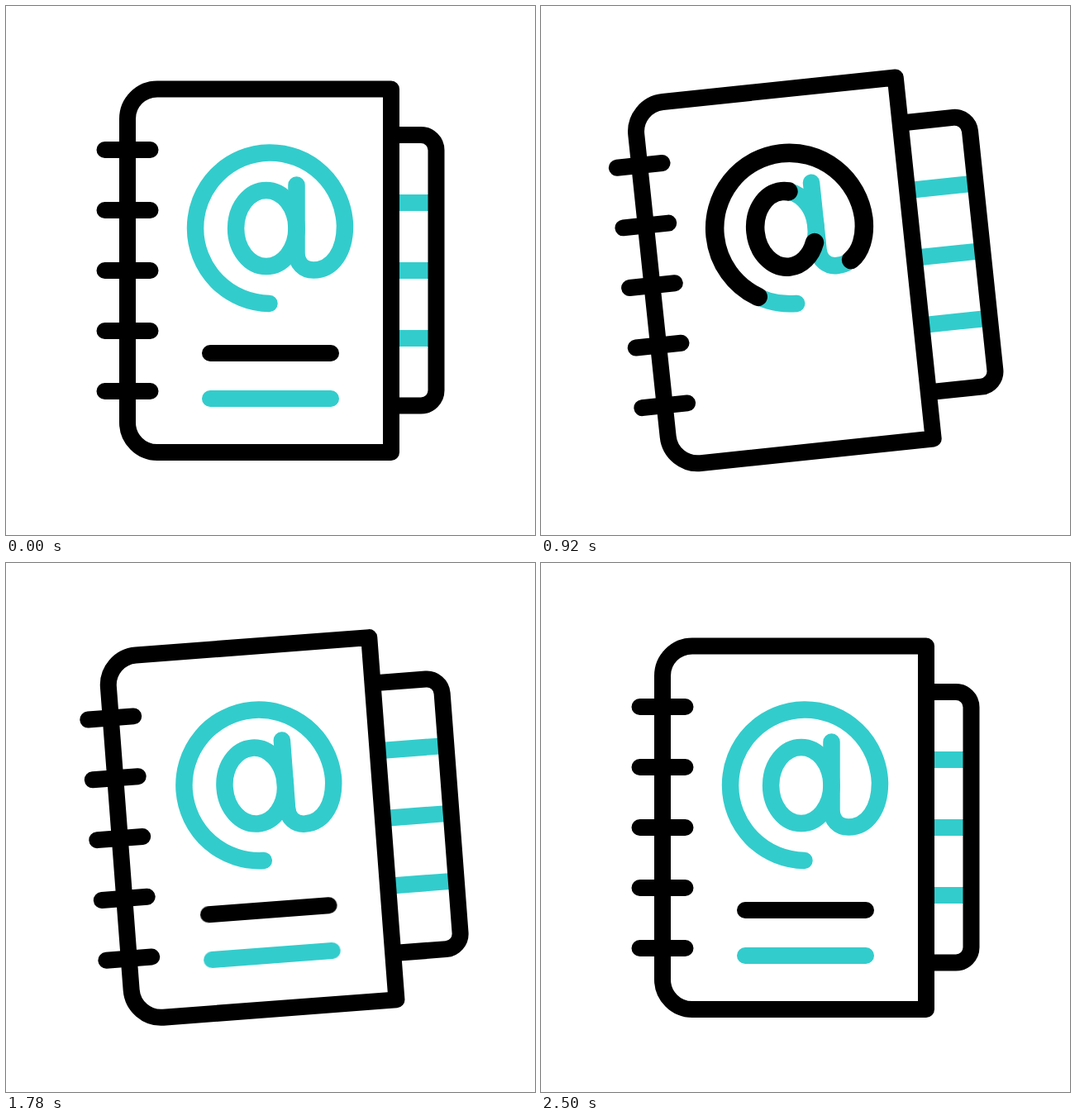
Recreate the animation shown at these times as an HTML page without scripts. Size 640 px wide and 640 px high, loop 2720 ms.

```html
<!DOCTYPE html>
<html lang="en">
<head>
<meta charset="utf-8">
<title>Address book</title>
<style>
  @property --head { syntax: "<length>"; inherits: false; initial-value: 100px; }
  @property --tail { syntax: "<length>"; inherits: false; initial-value: 0px; }

  :root { --loop: 2720ms; --smooth: cubic-bezier(.333, 0, .667, 1); }
  html, body { margin: 0; width: 100%; height: 100%; overflow: hidden; background: #fff; }
  svg {
    display: block; width: 100%; height: 100%;
    fill: none; stroke: #000; stroke-width: 20; stroke-linecap: round; stroke-linejoin: round;
  }

  .teal { stroke: #33cccc; }
  .cover { fill: #fff; }
  .sign { stroke-width: 20.5; }

  .book {
    transform-origin: 320px 320px;
    animation: tilt var(--loop) var(--smooth) infinite, drift var(--loop) var(--smooth) infinite;
  }
  .tabs { animation: slide var(--loop) var(--smooth) infinite; }

  /* Visible part of a path runs from --tail to --head, in percent of its length */
  .trim {
    stroke-dasharray: max(0px, var(--head) - var(--tail)) 200px;
    stroke-dashoffset: calc(-1 * var(--tail));
  }
  .trace {
    stroke-width: 22.5;
    animation: head var(--loop) var(--smooth) infinite,
               tail var(--loop) var(--smooth) infinite,
               show var(--loop) step-end infinite;
  }
  .line {
    animation: erase var(--loop) var(--smooth) infinite both,
               grow var(--loop) var(--smooth) infinite both;
  }
  .line.teal { animation-delay: 60ms, 150ms; }

  @keyframes tilt {
    0% { rotate: 0deg; }
    .74% { rotate: 0deg; animation-timing-function: cubic-bezier(.33, .62, .67, 1); }
    33.8%, 60.3% { rotate: -6deg; }
    75.2%, 100% { rotate: 0deg; }
  }
  @keyframes drift {
    0% { translate: 0; }
    .74% { translate: 0; animation-timing-function: cubic-bezier(.33, .87, .68, 1); }
    33.8%, 60.3% { translate: -13.5px; }
    75.2%, 100% { translate: 0; }
  }
  @keyframes slide {
    0%, .74% { translate: 0; }
    34.6%, 67.3% { translate: 28.5px; }
    91.9%, 100% { translate: 0; }
  }
  @keyframes head {
    0%, 14.3% { --head: 0px; }
    42.3%, 100% { --head: 100px; }
  }
  @keyframes tail {
    0%, 29% { --tail: 0px; }
    57.4%, 100% { --tail: 100px; }
  }
  @keyframes show {
    0% { stroke-opacity: 0; }
    14.5% { stroke-opacity: 1; }
    57.2%, 100% { stroke-opacity: 0; }
  }
  @keyframes erase {
    0%, 9.74% { --tail: 0px; }
    0% { opacity: 1; }
    20.96% { opacity: 1; animation-timing-function: linear; }
    24.1%, 33.1% { opacity: 0; }
    26.65%, 33.1% { --tail: 100px; }
    33.11%, 100% { --tail: 0px; opacity: 1; }
  }
  @keyframes grow {
    0%, 29.4% { --head: 100px; stroke-opacity: 1; }
    29.41%, 37.5% { --head: 0px; stroke-opacity: 0; }
    37.51% { stroke-opacity: 1; }
    54.4%, 100% { --head: 100px; stroke-opacity: 1; }
  }
</style>
</head>
<body>
<svg viewBox="0 0 640 640">
  <defs>
    <path id="swirl" pathLength="100" d="M318.5 360A90.5 91.3 0 1 1 410 266C410 297 395 319.5 372 319.5C360 319.5 351.5 311 351.5 298V216.5"/>
    <path id="bowl" pathLength="100" d="M351.5 269a36.7 46 0 1 1-73.4 0a36.7 46 0 1 1 73.4 0"/>
  </defs>
  <g class="book">
    <g class="tabs">
      <path class="teal" d="M425 238H515M425 320H515M425 402H515"/>
      <path d="M425 156H502A18.5 18.5 0 0 1 520.5 174.5V465A18.5 18.5 0 0 1 502 483.5H425"/>
    </g>
    <path class="cover" d="M183 100.5H466V540H183A36 36 0 0 1 147 504V136.5A36 36 0 0 1 183 100.5Z"/>
    <path d="M119.5 174h55m-55 73h55m-55 73h55m-55 73h55m-55 73h55"/>
    <g class="sign">
      <use class="teal" href="#swirl"/>
      <use class="teal" href="#bowl"/>
      <use class="trim trace" href="#swirl"/>
      <use class="trim trace" href="#bowl"/>
    </g>
    <path class="trim line" pathLength="100" d="M247 420H393"/>
    <path class="trim line teal" pathLength="100" d="M247 475H393"/>
  </g>
</svg>
</body>
</html>
```
